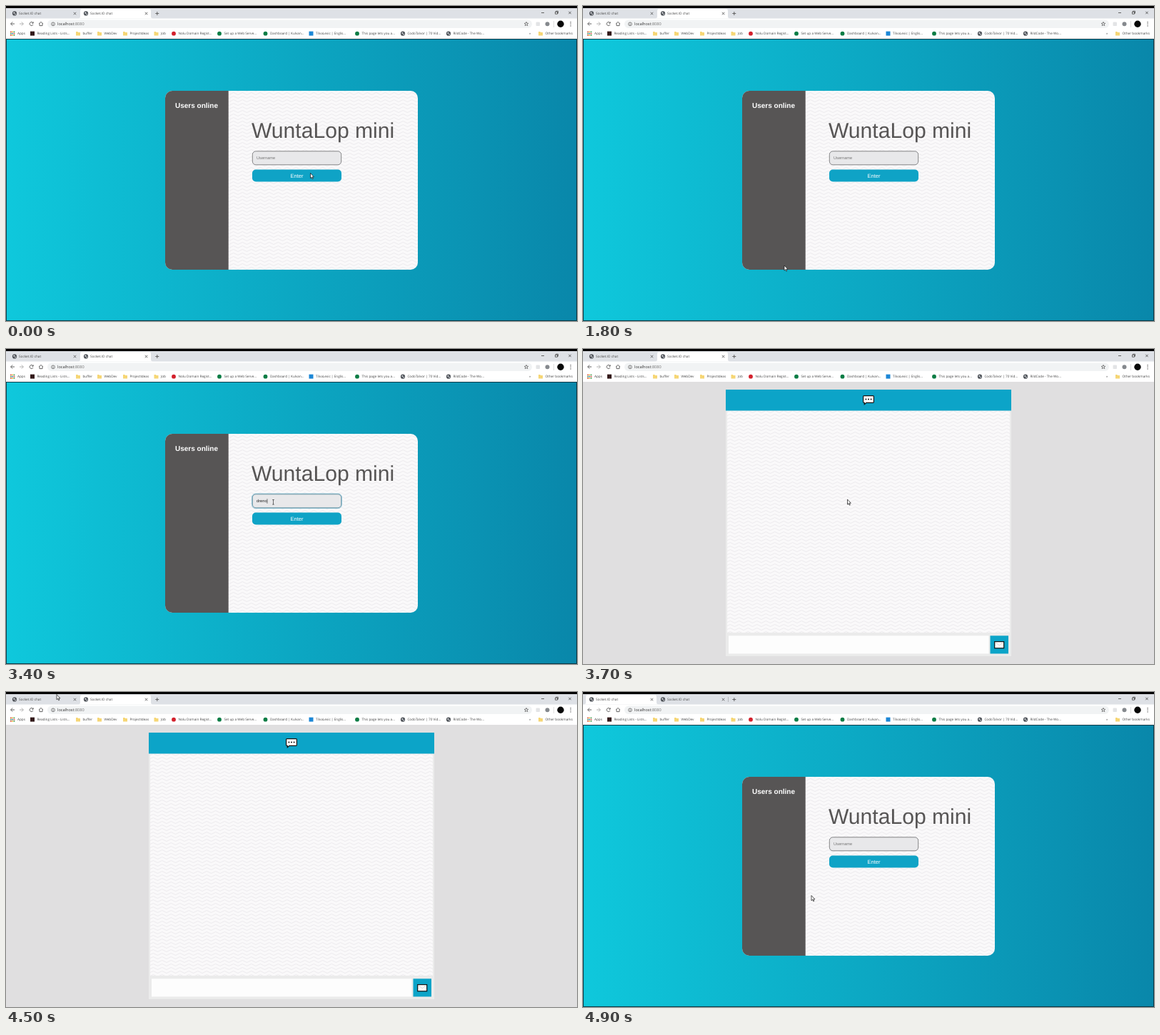
These frames come from a looping animation (800x442 px, 5 s). An HTML page:

```html
<!DOCTYPE html>
<html lang="en">
<head>
<meta charset="utf-8">
<title>Socket.IO chat</title>
<style>
html, body { margin: 0; width: 100%; height: 100%; overflow: hidden; background: #fff; }
svg { display: block; width: 100vw; height: 100vh; }
text { font-family: "Open Sans", "Noto Sans", sans-serif; font-size: 4.7px; fill: #444; text-rendering: geometricPrecision; white-space: pre; }
#login text { font-family: "Liberation Sans", Arial, sans-serif; }
.line { fill: none; stroke: #555; stroke-width: .9; }
</style>
</head>
<body>
<svg viewBox="0 0 800 442">
  <defs>
    <linearGradient id="sea">
      <stop offset="0" stop-color="#0fc8dc"/>
      <stop offset="1" stop-color="#0987aa"/>
    </linearGradient>
    <pattern id="waves" width="12.5" height="5" patternUnits="userSpaceOnUse">
      <rect width="12.5" height="5" fill="#faf9fa"/>
      <path d="M-1 4.2L0 4.5L6.25 1.5L12.5 4.5L13.5 4.2" fill="none" stroke="#eae8eb" stroke-width=".9"/>
    </pattern>
    <clipPath id="card"><rect x="223" y="119" width="354" height="251" rx="10"/></clipPath>
    <g id="globe">
      <circle r="3.1" fill="#50545a"/>
      <path d="M-2-.9L-.4-1.8L.6-.6L-.7.6ZM.7.6L2.2.1L1.4 1.9L.3 2Z" fill="#e8eaed"/>
    </g>
    <path id="folder" d="M-3-2.6h2.4l.8.8H3V2.7H-3Z" fill="#f6d675"/>
    <path id="cross" class="line" d="M-1.7-1.7L1.7 1.7M1.7-1.7L-1.7 1.7"/>
  </defs>

  <rect width="800" height="46.5" fill="#fff"/>
  <rect y="2.5" width="800" height="15" fill="#dee1e6"/>
  <rect width="800" height="3" fill="#000"/>
  <path id="tab" d="M1 17.5Q4 17.5 4 14.5V7Q4 4 7 4H100Q103 4 103 7V14.5Q103 17.5 106 17.5Z" fill="#fff"/>
  <path id="split" class="line" d="M203.5 7V14" style="stroke:#9a9da2;stroke-width:.6"/>
  <g id="tabs"></g>
  <path class="line" d="M209.3 10.5h5M211.8 8v5M750 9.5h4M769.5 8.2h3v3h-3zM770.5 8.2v-1h3v3h-1"/>
  <use href="#cross" x="790" y="9.5"/>

  <path class="line" d="M12 25H6.7M9.2 22.4L6.6 25L9.2 27.6"/>
  <path class="line" style="stroke:#aaa" d="M19 25h5.3M21.8 22.4L24.4 25L21.8 27.6"/>
  <path class="line" d="M37.7 23.5A2.5 2.5 0 1 0 38 26M38.2 22.2V24.2H36.2M46 25.2L49 22.3L52 25.2M47 24.5V27.6H51V24.5"/>
  <rect x="58" y="19.5" width="679" height="11.5" rx="5.7" fill="#f1f3f4"/>
  <circle class="line" cx="66" cy="25.3" r="2.4" style="stroke-width:.7"/>
  <path class="line" style="stroke-width:.8" d="M66 24.9V26.7M66 23.6V24.2"/>
  <text x="72" y="27.2" style="font-size:5.6px;fill:#333">localhost<tspan fill="#777">:8080</tspan></text>
  <path class="line" style="stroke-width:.7" d="M729 22.3l.8 1.9l2 .1l-1.6 1.3l.6 2l-1.8-1.1l-1.8 1.1l.6-2l-1.6-1.3l2-.1z"/>
  <rect x="742.5" y="22.5" width="5.5" height="5.5" rx="1" fill="#e3e4e6"/>
  <circle cx="758.5" cy="25.3" r="3" fill="#85898e"/>
  <path class="line" style="stroke:#ccc;stroke-width:.6" d="M767.5 21V30"/>
  <circle cx="777" cy="25.2" r="4.7" fill="#080808"/>
  <path d="M790.5 22h1.2v1.2h-1.2zM790.5 24.6h1.2v1.2h-1.2zM790.5 27.2h1.2v1.2h-1.2z" fill="#555"/>
  <g id="marks"></g>

  <g id="login">
    <rect y="46" width="800" height="396" fill="url(#sea)"/>
    <rect x=".5" y="46.5" width="799" height="395" fill="none" stroke="#08303c" stroke-width=".9"/>
    <g clip-path="url(#card)">
      <rect x="223" y="119" width="354" height="251" fill="url(#waves)"/>
      <rect x="223" y="119" width="88.7" height="251" fill="#575555"/>
    </g>
    <text x="237" y="142.8" style="font-size:10px;font-weight:bold;fill:#fff">Users online</text>
    <text x="344" y="184.6" style="font-size:30.1px;fill:#575555">WuntaLop mini</text>
    <rect id="ring" x="344.6" y="203" width="125.8" height="20.6" rx="5" fill="none" stroke="#8fc4d8" stroke-width="1"/>
    <rect id="field" x="345.3" y="203.8" width="124.4" height="19" rx="4.8" fill="#e8e8ea" stroke="#6a6a6c" stroke-width=".8"/>
    <text id="entry" x="351" y="215.2" style="font-size:5.7px"></text>
    <path id="caret" d="M0 210.3V216.8" stroke="#222" stroke-width=".6"/>
    <rect x="345" y="229.5" width="125" height="17" rx="5" fill="#0fa3c6"/>
    <text x="398.4" y="240.5" style="font-size:7.6px;fill:#fff">Enter</text>
  </g>

  <g id="chat">
    <rect y="46" width="800" height="396" fill="#e0dfe0"/>
    <rect x="200" y="57" width="400" height="374" fill="#ebebeb"/>
    <rect x="200" y="57" width="400" height="29.5" fill="#0ca4c8"/>
    <rect x="202" y="87" width="396" height="311" fill="url(#waves)"/>
    <rect x="204" y="402.3" width="364.5" height="25.2" fill="#fdfdfd"/>
    <rect x="570.5" y="402.3" width="25.5" height="25.2" fill="#0ca4c8"/>
    <path d="M393.7 65.6H406.3Q407.4 65.6 407.4 66.7V74.2Q407.4 75.3 406.3 75.3H397L394.3 77.6V75.3H393.7Q392.6 75.3 392.6 74.2V66.7Q392.6 65.6 393.7 65.6Z" fill="#fff" stroke="#111" stroke-width="1.2"/>
    <path d="M396.4 70.4h.01M400 70.4h.01M403.6 70.4h.01" stroke="#111" stroke-width="2" stroke-linecap="round"/>
    <rect x="576.7" y="410.6" width="13" height="9.2" fill="#fff" stroke="#111" stroke-width="1.2"/>
    <path d="M577.5 411.5L583.2 415.8L589 411.5" fill="none" stroke="#bbb" stroke-width=".6"/>
  </g>

  <path id="arrow" d="M0 0V7.2L1.6 5.7L2.7 8.2L3.8 7.7L2.7 5.3H4.9Z" fill="#fff" stroke="#111" stroke-width=".7"/>
  <path id="beam" d="M-1.3-3.3H1.3M0-3.3V3.3M-1.3 3.3H1.3" fill="none" stroke="#333" stroke-width=".7"/>
</svg>
<script>
const $ = id => document.getElementById(id);
const icon = (id, x, y) => `<use href="#${id}" x="${x}" y="${y}"/>`;
const label = (x, y, s) => `<text x="${x}" y="${y}">${s}</text>`;
const dot = (x, color) => `<circle cx="${x}" cy="38.7" r="2.9" fill="${color}"/>`;
const square = (x, color) => `<rect x="${x - 3}" y="35.6" width="6" height="6" fill="${color}"/>`;

$('tabs').innerHTML = [0, 100].map(x =>
  icon('globe', x + 12, 10.4) + label(x + 18, 12.2, 'Socket.IO chat') + icon('cross', x + 96.5, 10.5)).join('');

const green = '#0b7d45';
const marks = [
  [37, 'square', 'Reading Lists - Lists...', '#33191a'],
  [101, 'folder', 'buffer'],
  [131, 'folder', 'WebDev'],
  [167, 'folder', 'ProjectIdeas'],
  [210.5, 'folder', 'Job'],
  [235, 'dot', 'Nolu Domain Regist...', '#d3202c'],
  [299, 'dot', 'Set up a Web Serve...', green],
  [363.5, 'dot', 'Dashboard | Kulvan...', green],
  [427.5, 'square', 'TilvaLexic | Englis...', '#1c87d6'],
  [492, 'dot', 'This page lets you a...', green],
  [556, 'globe', 'CodoTalvor | 70 Vid...'],
  [620, 'globe', 'RildCode - The Wo...'],
  [749, 'folder', 'Other bookmarks'],
];
let bar = label(16, 40.4, 'Apps') + label(733, 40.2, '»');
for (let i = 0; i < 9; i++) {
  const color = ['#e2503f', '#3f7fe8', '#43a35a', '#eebb35'][(i * 3 + (i / 3 | 0)) % 4];
  bar += `<rect x="${6 + i % 3 * 2.3}" y="${35.5 + (i / 3 | 0) * 2.3}" width="1.7" height="1.7" fill="${color}"/>`;
}
for (const [x, kind, name, color] of marks) {
  bar += kind === 'dot' ? dot(x, color) : kind === 'square' ? square(x, color) : icon(kind, x, 38.7);
  bar += label(x + 6.4, 40.4, name);
}
$('marks').innerHTML = bar;

// Pointer stops: time, x, y
const path = [
  [0, 426.5, 234.5], [600, 422, 228], [1100, 414, 220], [1200, 414, 220], [1800, 282, 364],
  [2400, 374.5, 214.8], [3600, 374.5, 214.8], [3700, 370.5, 211],
  [4000, 370.5, 211], [4500, 71, 3.5], [4600, 71, 3.5], [4900, 320, 285.5], [5000, 320, 285.5],
];
const typing = [[3000, 1], [3200, 2], [3300, 4], [3400, 5]];
const userName = 'dreno';
const show = (id, on) => $(id).style.display = on ? '' : 'none';

function pointer(t) {
  const i = path.findIndex(p => p[0] > t);
  const [t0, x0, y0] = path[i - 1], [t1, x1, y1] = path[i];
  const k = (t - t0) / (t1 - t0), e = k * k * (3 - 2 * k);
  return [x0 + (x1 - x0) * e, y0 + (y1 - y0) * e];
}

function draw(t) {
  const first = t >= 4600, chat = t >= 3700 && !first, focus = t >= 2400 && t < 3700;
  show('login', !chat);
  show('chat', chat);
  show('split', first);
  $('tab').setAttribute('transform', `translate(${first ? 0 : 100})`);

  let typed = 0;
  if (focus) for (const [at, n] of typing) if (t >= at) typed = n;
  const entry = $('entry');
  entry.textContent = typed ? userName.slice(0, typed) : 'Username';
  entry.style.fill = typed ? '#222' : '#777';
  $('field').setAttribute('stroke', focus ? '#4d7f92' : '#6a6a6c');
  show('ring', focus);
  show('caret', typed);
  if (typed) $('caret').setAttribute('transform', `translate(${351.4 + entry.getComputedTextLength()})`);

  const [x, y] = pointer(t);
  const over = !chat && x > 345 && x < 470 && y > 203 && y < 223 && t > 1800 && t < 3700;
  show('beam', over);
  show('arrow', !over);
  $(over ? 'beam' : 'arrow').setAttribute('transform', `translate(${x} ${y})`);
}

const start = performance.now();
function tick() {
  const t = (performance.now() - start) % 5000;
  draw(Math.floor(t / 100) * 100);
  requestAnimationFrame(tick);
}
tick();
</script>
</body>
</html>
```
